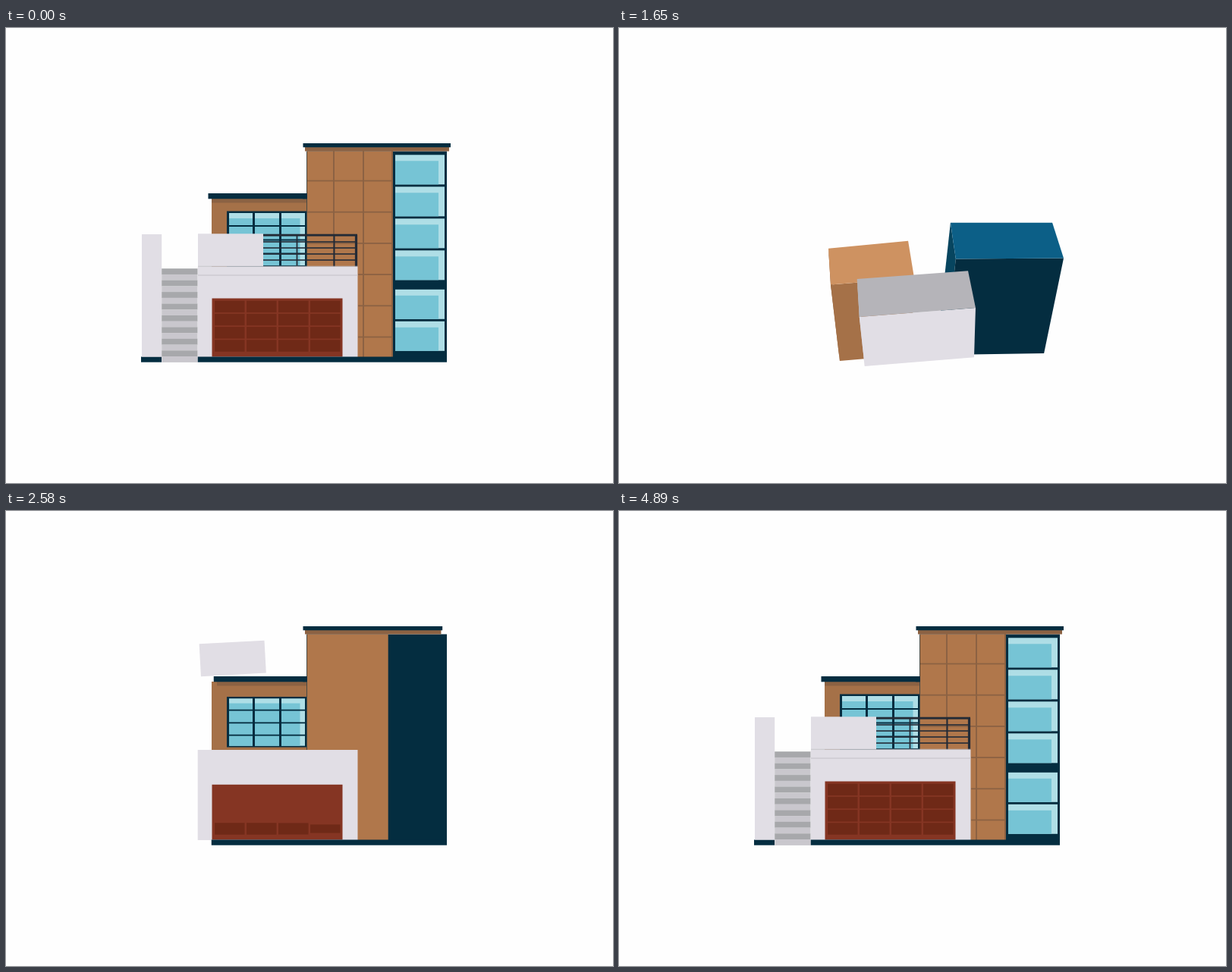
Animation of 800 by 600 pixels, one loop 4920 ms. Source, as an HTML page with a canvas:

```html
<!DOCTYPE html>
<html lang="en">
<head>
<meta charset="utf-8">
<title>House assembly</title>
<style>
html, body { margin: 0; width: 100%; height: 100%; overflow: hidden; background: #fefefe; }
canvas { display: block; }
</style>
</head>
<body>
<canvas id="stage" width="800" height="600"></canvas>
<script>
const ctx = document.getElementById('stage').getContext('2d');
const LOOP = 4920;
const C = {
  paper: '#fefefe', navy: '#042d40', white: '#e1dee5', wall: '#a57148', tower: '#b0774b',
  seam: '#8c6243', door: '#853523', panel: '#6f2917', glass: '#76c4d5', shine: '#afdee6',
  rail: '#242b36', line: '#c3c1c8', step: '#c9c7cd', stepDark: '#a7a8ab'
};

const clamp = v => Math.max(0, Math.min(1, v));
const out3 = p => 1 - (1 - p) ** 3;
const inOut = p => p * p * (3 - 2 * p);
const phase = (t, start, dur) => clamp((t - start) / dur);
const grow = (t, start, dur) => out3(phase(t, start, dur));

function rect(x0, y0, x1, y1, color) {
  ctx.fillStyle = color;
  ctx.fillRect(x0, y0, x1 - x0, y1 - y0);
}

function poly(points, color) {
  ctx.fillStyle = color;
  ctx.beginPath();
  points.forEach(([x, y]) => ctx.lineTo(x, y));
  ctx.closePath();
  ctx.fill();
}

// Block corners: top back L/R, top front R/L, bottom front R/L
const block = (x0, x1, back, front, bottom) =>
  [[x0, back], [x1, back], [x1, front], [x0, front], [x1, bottom], [x0, bottom]];

const blocks = [
  { // left wing
    colors: ['#ce9261', C.wall, '#8a5c39'],
    plan: block(286, 374, 360, 434.5, 434.5),
    tilt: [[276, 291], [381, 281], [389, 330], [279, 339], [385, 431], [291, 439]],
    front: block(271, 397, 225, 225, 434),
    sway: [[-13, 0], [0, 0]]
  },
  { // tower
    colors: ['#0c5f87', C.navy, '#07455f'],
    plan: block(452, 540, 360, 434.5, 434.5),
    tilt: [[437, 257], [571, 257], [586, 304], [444, 305], [560, 429], [430, 431]],
    front: block(396, 581, 162.5, 162.5, 434),
    sway: [[0, 0], [7, 0]]
  },
  { // garage
    colors: ['#b5b4b9', C.white, '#cbc9cf'],
    plan: block(374, 452, 360, 434.5, 434.5),
    tilt: [[314, 331], [460, 320], [470, 369], [317, 381], [468, 434], [324, 446]],
    front: block(253, 463, 315, 315, 434),
    sway: [[0, 33], [0, 28]]
  }
];

function drawBlock([tlb, trb, trf, tlf, brf, blf], [top, front, side]) {
  const blb = [blf[0] + tlb[0] - tlf[0], blf[1] + tlb[1] - tlf[1]];
  poly([tlb, tlf, blf, blb], side);
  poly([tlf, trf, brf, blf], front);
  poly([tlb, trb, trf, tlf], top);
}

function drawPlan(t) {
  const s = grow(t, 180, 600);
  if (!s) return;
  const e = inOut(phase(t, 810, 300));
  for (const [x, color] of [[83, blocks[1].colors[0]], [0, blocks[2].colors[0]], [-83, blocks[0].colors[0]]]) {
    const cx = 413 + x * e;
    const w = (x ? 44 : 39) * s;
    rect(cx - w, 397.2 - 37.2 * s, cx + w, 397.2 + 37.2 * s, color);
  }
}

function drawTilt(t) {
  const second = t > 1650;
  const p = phase(t, second ? 1650 : 1140, second ? 540 : 510);
  const e = second ? 1 - (1 - p) ** 2 : p * p;
  const bump = Math.sin(Math.PI * p);
  for (const b of blocks) {
    const from = second ? b.tilt : b.plan;
    const to = second ? b.front : b.tilt;
    const [sx, sy] = b.sway[+second];
    drawBlock(from.map(([x, y], i) => [
      x + (to[i][0] - x) * e + sx * bump,
      y + (to[i][1] - y) * e + sy * bump
    ]), b.colors);
  }
}

function drawTower(t, wipe) {
  rect(396, 162.5, 581, 434, C.navy);
  rect(396.6, 162.5, 396.6 + 113.4 * wipe, 434, C.tower);
  [[432, 315, 2620], [471, 434, 2680], [509, 434, 2760]].forEach(([x, end, start]) => {
    const h = (end - 162) * grow(t, start, 700);
    rect(x - 1, 162, x + 1, 162 + h, C.seam);
  });
  const run = grow(t, 2965, 650);
  for (let i = 0; i < 6; i++) {
    const y = 201.5 + i * 41.2;
    const left = i < 3 ? 397 : 464;
    rect(509 - (509 - left) * run, y - 0.9, 509, y + 0.9, C.seam);
  }
  rect(394, 157, 394 + 190 * wipe, 162.5, C.seam);
  rect(391.5, 152, 391.5 + 194.5 * wipe, 157.3, C.navy);
}

function drawWing(t, wipe) {
  rect(271, 225, 396.5, 434, C.wall);
  rect(397 - 126 * wipe, 225, 397, 230.5, C.seam);
  rect(397 - 130.5 * wipe, 218, 397, 225.3, C.navy);
  const s = grow(t, 2320, 480);
  if (!s) return;
  ctx.save();
  ctx.translate(0, 278 * (1 - s));
  ctx.scale(1, s);
  rect(291, 241.5, 397, 315, C.navy);
  rect(294, 244, 394, 313, C.shine);
  rect(294, 251, 387.5, 313, C.glass);
  for (const x of [326.5, 361.5]) rect(x - 1.5, 242, x + 1.5, 314, C.navy);
  for (const y of [261, 279.5, 297.5]) rect(292, y - 1, 396, y + 1, C.navy);
  ctx.restore();
}

function drawGarage(t, wipe) {
  rect(252.7, 315, 463.5, 434, C.white);
  rect(271.5, 433.5 - 77 * wipe, 443.5, 433.5, C.door);
  // Panels open one by one from the bottom row
  for (let i = 0; i < 16; i++) {
    const row = Math.floor(i / 4);
    const col = row ? 3 - i % 4 : i;
    const h = 7.7 * grow(t, 2205 + i * 95, 260);
    const x = 275 + col * 42;
    const y = 419 - row * 17.2;
    rect(x, y - h, x + 39.5, y + h, C.panel);
  }
}

function drawBalcony(t) {
  const left = (1 - phase(t, 2180, 1166)) ** 3;
  ctx.save();
  ctx.translate(253 + 14 * left, 314.3 - 340 * left);
  ctx.rotate(-11 * left * Math.PI / 180);
  rect(0, -43, 86, 0, C.white);
  ctx.restore();

  const w = 210.5 * grow(t, 3090, 450);
  rect(253, 313.8, 253 + w, 314.8, C.line);
  rect(253, 325.5, 253 + w, 326.5, C.line);
}

function drawRailing(t) {
  [282, 290, 298, 306].forEach((y, i) => {
    rect(339, y - 0.8, 339 + 123 * grow(t, 3240 + i * 50, 350), y + 0.8, C.rail);
  });
  [[383.5, 0.9], [432.5, 1], [461.5, 1.6]].forEach(([x, r], i) => {
    rect(x - r, 315 - 42 * grow(t, 3130 + i * 60, 330), x + r, 315, C.rail);
  });
  rect(339, 271.7, 339 + 124 * grow(t, 3200, 400), 274.6, C.rail);
}

function drawWindows(t) {
  for (let i = 0; i < 6; i++) {
    const s = grow(t, 2600 + i * 120, 360);
    if (!s) continue;
    const y = 167.3 + i * 42 + (i > 3 ? 9.5 : 0);
    ctx.save();
    ctx.translate(545.5, y + 19.5);
    ctx.transform(1, 0, 0.13 * (1 - s), s, 0, 0);
    rect(-32.5, -19.5, 32.5, 19.5, C.shine);
    rect(-32.5, -11.5, 24.5, 19.5, C.glass);
    ctx.restore();
  }
}

function drawGround(t, wipe) {
  rect(581 - 328.5 * wipe, 433.5, 581, 440.7, C.navy);
  rect(205 - 27 * grow(t, 3300, 480), 433.5, 205, 440.7, C.navy);
  rect(205.2 - 26.2 * grow(t, 3340, 760), 272, 205.2, 433.5, C.white);
  // Stairs slide out of the garage wall, lowest step first
  for (let i = 0; i < 16; i++) {
    const y = 317.2 + i * 7.72;
    const w = 47.3 * grow(t, 3030 + (15 - i) * 24, 330);
    rect(252.5 - w, y, 252.5, y + 7.9, i % 2 ? C.step : C.stepDark);
  }
}

function drawHouse(t) {
  const wipe = grow(t, 2210, 600);
  drawWing(t, wipe);
  drawTower(t, wipe);
  // The wing's roof and window overlap the tower edge
  rect(397 - 6 * wipe, 218, 397, 225.3, C.navy);
  drawGarage(t, wipe);
  drawRailing(t);
  drawBalcony(t);
  drawWindows(t);
  drawGround(t, wipe);
}

function draw() {
  const t = performance.now() % LOOP;
  rect(0, 0, 800, 600, C.paper);
  if (t < 60) drawHouse(LOOP);
  else if (t < 1140) drawPlan(t);
  else if (t < 2190) drawTilt(t);
  else drawHouse(t);
  requestAnimationFrame(draw);
}
draw();
</script>
</body>
</html>
```
